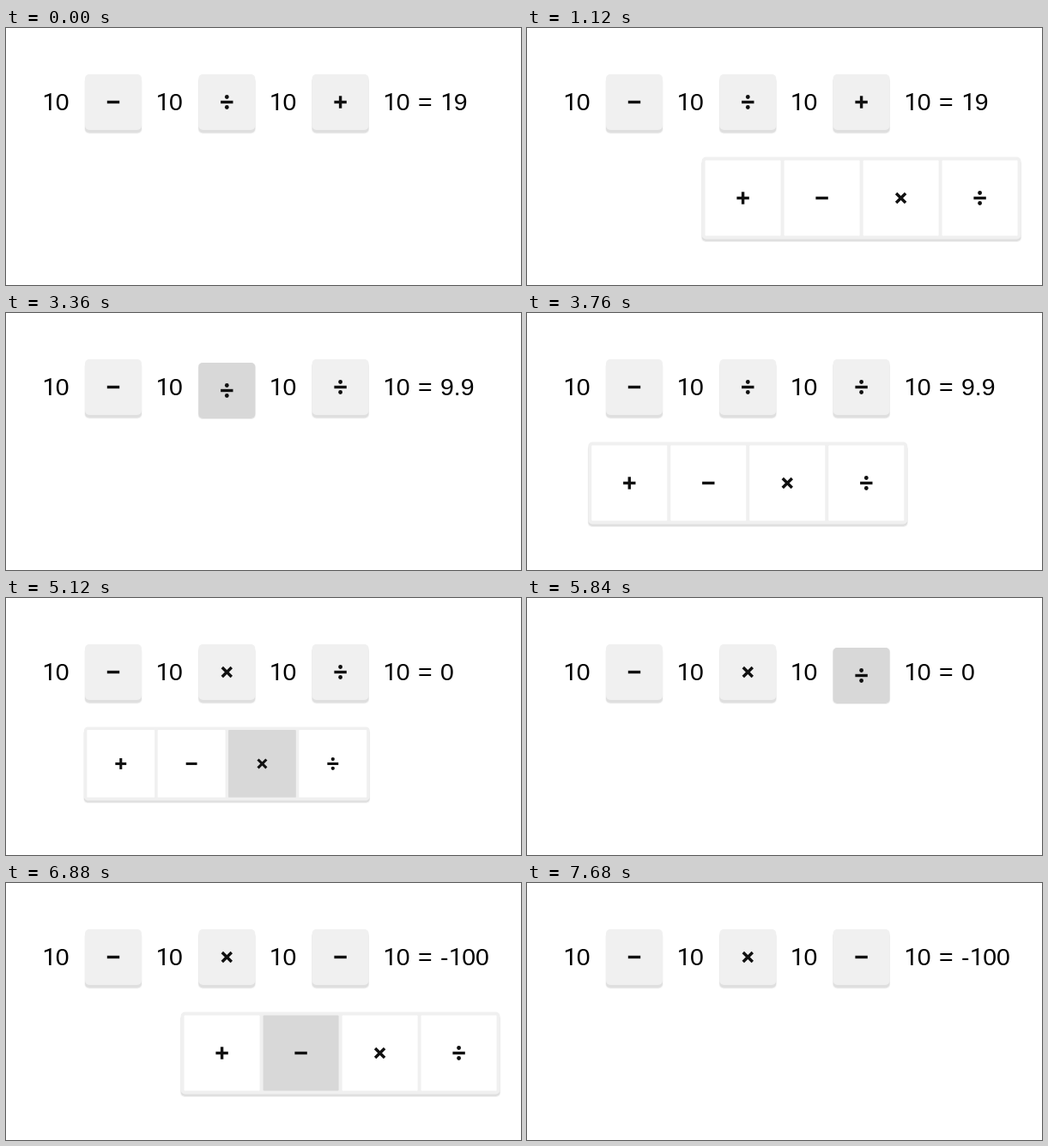
An HTML page with a canvas for the animation above (8000 ms loop, 600x300 px).

```html
<!DOCTYPE html>
<html lang="en">
<head>
<meta charset="utf-8">
<title>Operator picker</title>
<style>
  html, body { margin: 0; width: 100%; height: 100%; overflow: hidden; background: #fff; }
  canvas { display: block; width: 600px; height: 300px; }
</style>
</head>
<body>
<canvas id="stage"></canvas>
<script>
const LOOP = 8000, STEP = 80;
const PITCH = 132.3, FIRST_TEXT = 42, FIRST_BUTTON = 125;
const FONT_SIZE = 28.4, WORD_GAP = 1.6, BASELINE = 96;
const BUTTON_Y = 86.5, MENU_TOP = 150.5;
const CELL = 88, GAP = 4;
const LIGHT = '#f0f0f0', LIP = '#dfdfdf', PRESSED = '#d8d8d8';
const OPS = ['+', '−', '×', '÷'];
const START = { ops: ['−', '÷', '+'], result: '19' };

// Each round: press a button, open its menu, pick an operator, close.
const ROUNDS = [
  { button: 2, press: 720, open: 960, pick: 1760, close: 2480, op: '÷', result: '9.9' },
  { button: 1, press: 3360, open: 3600, pick: 4400, close: 5120, op: '×', result: '0' },
  { button: 2, press: 5840, open: 6080, pick: 6880, close: 7600, op: '−', result: '-100' }
];

const canvas = document.getElementById('stage');
const ctx = canvas.getContext('2d');
const ratio = window.devicePixelRatio || 1;
canvas.width = 600 * ratio;
canvas.height = 300 * ratio;

function box(x, y, w, h, r, color) {
  ctx.fillStyle = color;
  ctx.beginPath();
  ctx.roundRect(x, y, w, h, r);
  ctx.fill();
}

function dot(x, y, r) {
  ctx.beginPath();
  ctx.arc(x, y, r, 0, Math.PI * 2);
  ctx.fill();
}

function symbol(op, x, y) {
  const arm = op === '×' ? 7.8 : 7.2;
  ctx.save();
  ctx.translate(x, y);
  ctx.fillStyle = '#111';
  if (op === '×') ctx.rotate(Math.PI / 4);
  ctx.fillRect(-arm, -1.7, 2 * arm, 3.4);
  if (op === '+' || op === '×') ctx.fillRect(-1.7, -arm, 3.4, 2 * arm);
  if (op === '÷') {
    dot(0, -6, 2.4);
    dot(0, 6, 2.4);
  }
  ctx.restore();
}

// The "1" is set in a face without a foot serif; spacing stays uniform.
function text(str, x) {
  ctx.fillStyle = '#000';
  for (const ch of str) {
    ctx.font = FONT_SIZE + 'px "Liberation Sans", Arial, sans-serif';
    const advance = ctx.measureText(ch).width + (ch === ' ' ? WORD_GAP : 0);
    if (ch === '1') ctx.font = FONT_SIZE + 'px Roboto, sans-serif';
    ctx.fillText(ch, ch === '1' ? x + 0.5 : x, BASELINE);
    x += advance;
  }
}

function button(x, op, down) {
  const y = BUTTON_Y + (down ? 4 : 0);
  const left = x - 33, top = y - 32.5;
  if (down) {
    box(left - 0.5, top, 67, 66, 5, '#ececec');
    box(left, top, 66, 65, 5, PRESSED);
  } else {
    box(left - 0.5, top + 3.5, 67, 66, 5, '#f4f4f4');
    box(left, top + 3, 66, 65.5, 5, LIP);
    box(left, top, 66, 65, 5, LIGHT);
  }
  symbol(op, x, y);
}

function menu(x, scale, picked) {
  const w = 4 * CELL + 5 * GAP, h = CELL + 2 * GAP;
  ctx.save();
  ctx.translate(x, MENU_TOP);
  ctx.scale(scale, scale);
  box(-w / 2 - 0.5, 3.5, w + 1, h, 5, '#f4f4f4');
  box(-w / 2, 3, w, h - 0.5, 5, LIP);
  box(-w / 2, 0, w, h, 5, LIGHT);
  OPS.forEach((op, i) => {
    const left = -w / 2 + GAP + i * (CELL + GAP);
    box(left, GAP, CELL, CELL, 1, op === picked ? PRESSED : '#fff');
    symbol(op, left + CELL / 2, GAP + CELL / 2);
  });
  ctx.restore();
}

function menuScale(round, t) {
  const opening = Math.min(1, (t - round.open + STEP) / (3 * STEP));
  if (t >= round.close) return 0.895;
  return 1 - (1 - opening) ** 2;
}

function draw(t) {
  const ops = [...START.ops];
  let result = START.result, down = -1;
  for (const r of ROUNDS) {
    if (t >= r.pick) {
      ops[r.button] = r.op;
      result = r.result;
    }
    if (t >= r.press && t < r.open) down = r.button;
  }

  ctx.setTransform(ratio, 0, 0, ratio, 0, 0);
  ctx.fillStyle = '#fff';
  ctx.fillRect(0, 0, 600, 300);
  ops.forEach((op, i) => {
    text('10', FIRST_TEXT + i * PITCH);
    button(FIRST_BUTTON + i * PITCH, op, i === down);
  });
  text('10 = ' + result, FIRST_TEXT + 3 * PITCH);

  const active = ROUNDS.find(r => t >= r.open && t < r.close + STEP);
  if (active) {
    const x = FIRST_BUTTON + active.button * PITCH;
    menu(x, menuScale(active, t), t >= active.pick ? active.op : null);
  }
}

const begin = performance.now();
function frame() {
  const t = (performance.now() - begin) % LOOP;
  draw(Math.floor(t / STEP) * STEP);
  requestAnimationFrame(frame);
}
frame();
</script>
</body>
</html>
```
